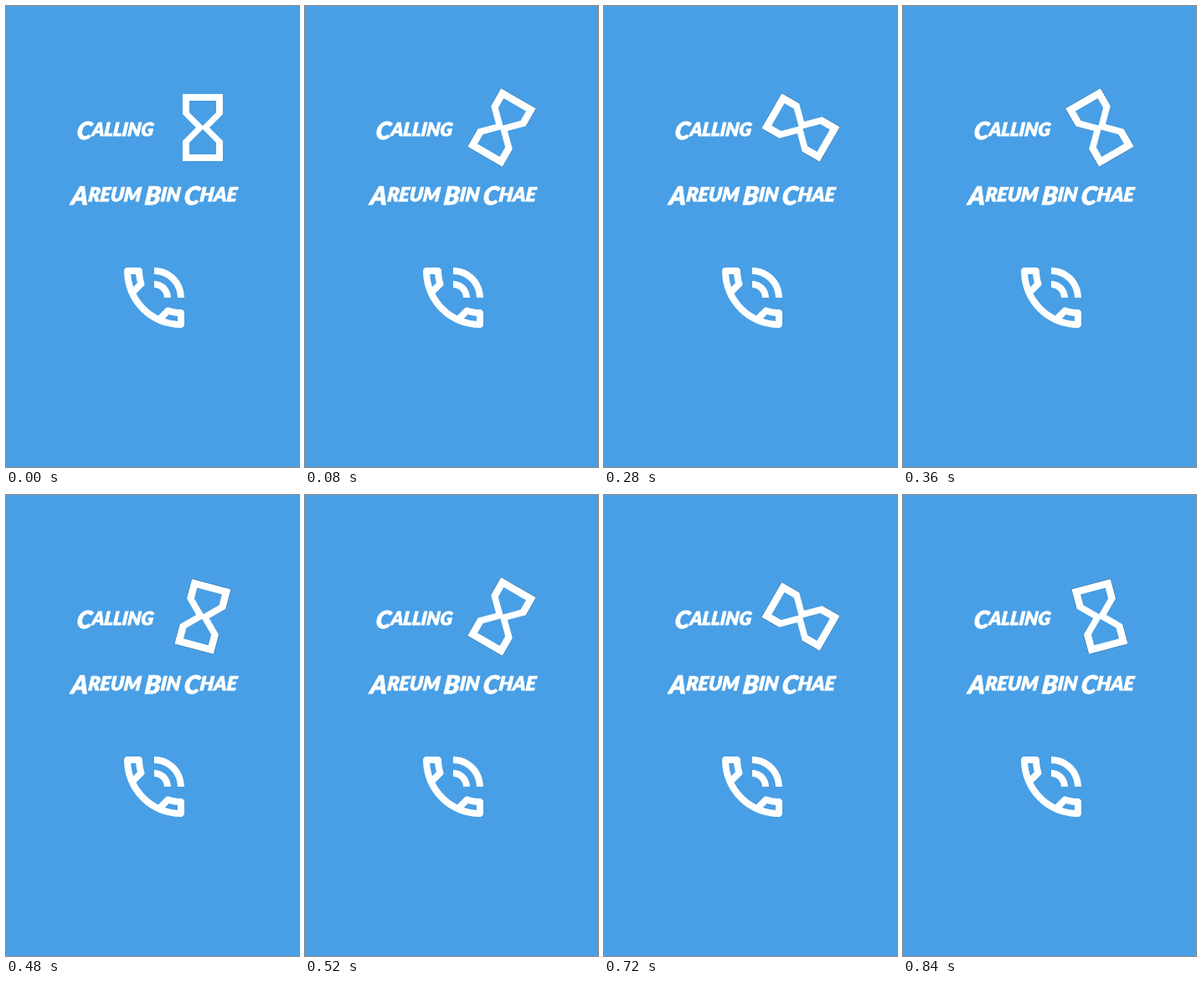
Animation of 350x550 px, one loop 880 ms. Source, as an HTML page:

```html
<!DOCTYPE html>
<html lang="en">
<head>
<meta charset="utf-8">
<title>Calling</title>
<style>
  html, body { margin: 0; width: 100%; height: 100%; overflow: hidden; background: #489fe5; }
  svg { display: block; width: 350px; height: 550px; }
  text {
    font: italic 900 22px Lato, "Open Sans", sans-serif;
    text-anchor: middle; fill: #fff; stroke: #fff; stroke-width: .8px;
  }
  #caller { font-size: 23px; }
  .cap { font-size: 1.31em; }
</style>
</head>
<body>
<svg viewBox="0 0 350 550">
  <rect width="350" height="550" fill="#489fe5"/>
  <text id="status" transform="translate(130 155) skewX(-6)"></text>
  <text id="caller" transform="translate(176.500 233) skewX(-6)"></text>
  <g id="glass">
    <g class="soft" fill="none">
      <path d="M6 8V2H18V8M6 16V22H18V16" stroke="#1c3048" stroke-width=".2" opacity=".6"/>
      <path d="M16 16.500V20H8v-3.500l4-4zM12 11.500l-4-4V4h8v3.500z" stroke="#fff" stroke-width=".3"/>
    </g>
    <path fill="#fff" d="M6 2v6h.01L6 8.01 10 12l-4 4 .01.01H6V22h12v-5.99h-.01L18 16l-4-4 4-3.99-.01-.01H18V2H6zm10 14.500V20H8v-3.500l4-4 4 4zm-4-5l-4-4V4h8v3.500l-4 4z"/>
  </g>
  <path fill="#fff" transform="translate(129 300) scale(4)" d="M19 12h2c0-4.970-4.030-9-9-9v2c3.870 0 7 3.130 7 7zm-4 0h2c0-2.760-2.240-5-5-5v2c1.660 0 3 1.340 3 3zm5 3.500c-1.250 0-2.450-.2-3.570-.57-.1-.03-.21-.05-.31-.05-.26 0-.51.1-.71.29l-2.200 2.200c-2.830-1.440-5.150-3.750-6.590-6.590l2.200-2.200c.28-.27.36-.66.25-1.010C8.700 6.450 8.500 5.250 8.500 4c0-.55-.45-1-1-1H4c-.55 0-1 .45-1 1 0 9.390 7.610 17 17 17 .55 0 1-.45 1-1v-3.500c0-.55-.45-1-1-1zM5.030 5h1.500c.07.88.22 1.750.46 2.590L5.790 8.800c-.41-1.210-.67-2.480-.76-3.800zM19 18.970c-1.320-.09-2.600-.35-3.800-.75l1.200-1.200c.85.24 1.710.39 2.600.46v1.490z"/>
</svg>
<script>
  const STEP = 40, HALF_TURN = 11, LOOP = 880;
  const $ = id => document.getElementById(id);
  const glass = $("glass"), soft = glass.querySelector(".soft");

  // Small capitals with larger initials that hang below the baseline.
  function setCaps(id, str) {
    $(id).innerHTML = str.split(" ").map(word =>
      `<tspan class="cap" dy="4">${word[0]}</tspan>` +
      `<tspan dy="-4">${word.slice(1).toUpperCase()}</tspan>`
    ).join(" ");
  }

  // The glass turns in 15 degree steps; its soft edges show only when tilted.
  function draw(ms) {
    const i = Math.floor((ms % LOOP) / STEP) % HALF_TURN;
    const deg = 15 * (i > 2 ? i + 1 : i);
    glass.setAttribute("transform",
      `translate(235 145) rotate(${deg}) scale(4) translate(-12 -12)`);
    soft.setAttribute("visibility", deg ? "visible" : "hidden");
  }

  setCaps("status", "Calling");
  setCaps("caller", "Areum Bin Chae");
  draw(0);

  let start;
  requestAnimationFrame(function tick(now) {
    start ??= now;
    draw(now - start);
    requestAnimationFrame(tick);
  });
</script>
</body>
</html>
```
